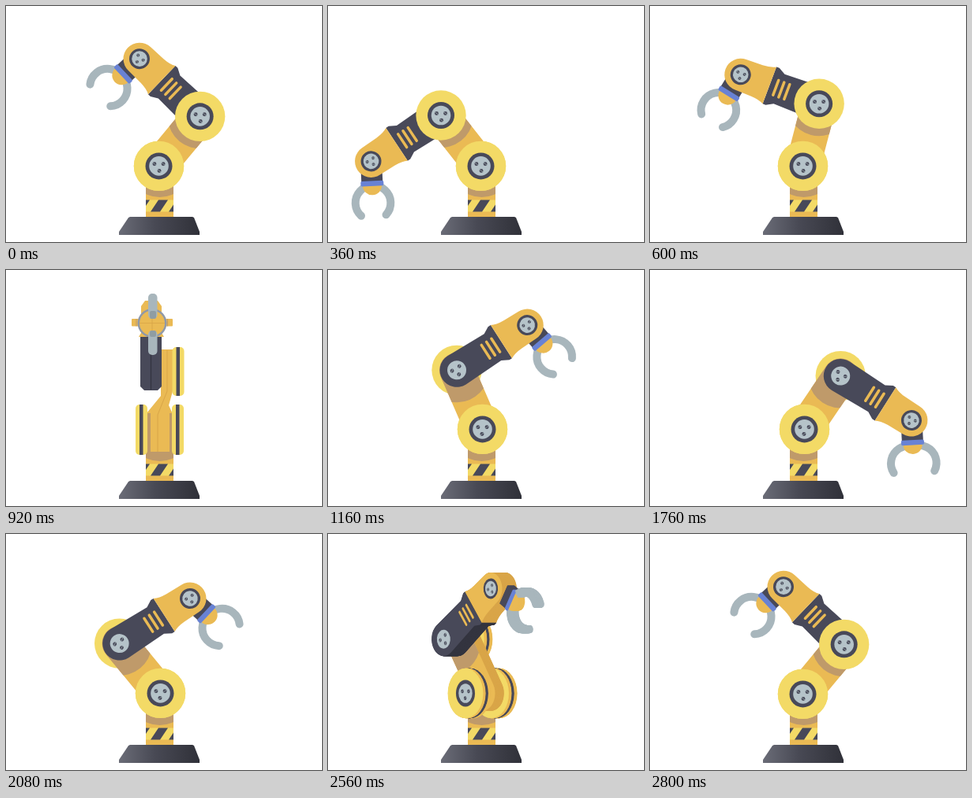
Recreate the animation shown at these times as an HTML page with a canvas. Size 400 by 300 pixels, loop 3520 ms.

```html
<!DOCTYPE html>
<html lang="en">
<head>
<meta charset="utf-8">
<title>Robot arm</title>
<style>
html, body { margin: 0; width: 100%; height: 100%; overflow: hidden; background: #fff; }
canvas { display: block; width: 400px; height: 300px; }
</style>
</head>
<body>
<canvas id="stage" width="400" height="300"></canvas>
<script>
const ctx = document.getElementById('stage').getContext('2d');
const LOOP = 3520, STEP = 40, TAU = Math.PI * 2, RAD = Math.PI / 180;
const LOWER = 81.8, UPPER = 106, CLAW_RING = 53;
const C = {
  pale: '#f3da66', gold: '#eaba54', edge: '#d9a548', shade: '#bf9a6a',
  dark: '#484959', ink: '#33343f', steel: '#a8b6bc', steelLight: '#b5c3c9',
  steelDim: '#8f9da3', blue: '#6882d4'
};

const linear = x => x, smooth = x => x * x * (3 - 2 * x), speedUp = x => x * x;

// time, yaw, lower arm, upper arm, claw direction (degrees), grip, easing into the key
const KEYS = [
  [0, 0, -39.6, -43.7, 43, .3, linear],
  [240, 0, 38, 33, 92, 1, smooth],
  [360, 0, 38.1, 33.4, 92.7, 0, smooth],
  [560, 0, -13, -3, 63, 0, speedUp],
  [640, 0, -16.2, -37.8, 53.5, 0, linear],
  [760, 0, -16.2, -37.8, 53.5, 0, linear],
  [920, 90, -26, -42, 20, 0, linear],
  [1080, 180, -30, -40, 45, 0, linear],
  [1120, 180, -30, -40, 45, 0, linear],
  [1320, 180, 33.5, 30.3, 88, 0, smooth],
  [1400, 180, 36, 33.5, 88, 0, linear],
  [1440, 180, 36, 33.5, 88, 0, linear],
  [1640, 180, 36, 33.5, 88, 1, smooth],
  [1720, 180, 35, 33, 87, 1, linear],
  [1760, 180, 34, 32.2, 87, 1, linear],
  [1880, 180, 10, 5, 65, .7, speedUp],
  [2080, 180, -39.3, -32.6, 43, .3, linear],
  [2480, 180, -39.3, -32.6, 43, .3, linear],
  [2640, 90, -26, -42, 20, .3, linear],
  [2800, 0, -39.6, -43.7, 43, .3, linear],
  [LOOP, 0, -39.6, -43.7, 43, .3, linear]
];

function poseAt(t) {
  const i = KEYS.findIndex(k => k[0] > t), p = KEYS[i - 1], q = KEYS[i];
  const x = q[6]((t - p[0]) / (q[0] - p[0]));
  const [yaw, a, b, d, grip] = [1, 2, 3, 4, 5].map(n => p[n] + (q[n] - p[n]) * x);
  return { yaw: yaw * RAD, a: a * RAD, b: b * RAD, d: d * RAD, grip };
}

function poly(points, fill) {
  ctx.beginPath();
  points.forEach(([x, y]) => ctx.lineTo(x, y));
  ctx.closePath();
  ctx.fillStyle = fill;
  ctx.fill();
}

function circle(x, y, r, fill) {
  ctx.beginPath();
  ctx.arc(x, y, r, 0, TAU);
  ctx.fillStyle = fill;
  ctx.fill();
}

function box(x, y, w, h, fill, r = 0) {
  ctx.beginPath();
  ctx.roundRect(x, y, w, h, r);
  ctx.fillStyle = fill;
  ctx.fill();
}

function line(x1, y1, x2, y2, width, color, cap = 'butt') {
  ctx.beginPath();
  ctx.moveTo(x1, y1);
  ctx.lineTo(x2, y2);
  ctx.lineWidth = width;
  ctx.strokeStyle = color;
  ctx.lineCap = cap;
  ctx.stroke();
}

function bolt(x, y, ring, r) {
  if (ring) circle(x, y, ring, C.dark);
  circle(x, y, r, C.steelLight);
  for (const k of [-155, -25, 95]) {
    const sx = x + Math.cos(k * RAD) * r * .5, sy = y + Math.sin(k * RAD) * r * .5;
    circle(sx, sy, r * .2, C.dark);
    line(sx - r * .18, sy + r * .13, sx + r * .18, sy - r * .13, .9, C.steelDim);
  }
}

function drawBase() {
  const g = ctx.createLinearGradient(143, 0, 245, 0);
  g.addColorStop(0, '#6a6c77');
  g.addColorStop(.45, '#484954');
  g.addColorStop(1, '#303139');
  poly([[155, 269], [157, 268], [236, 268], [238, 269], [245, 287], [245, 291],
    [143, 291], [143, 287]], g);
}

function drawColumn() {
  ctx.save();
  ctx.beginPath();
  ctx.rect(177, 215, 35, 53);
  ctx.clip();
  box(177, 215, 35, 53, C.gold);
  circle(194.5, 203, 40, C.shade);
  box(177, 246.5, 35, 15, C.pale);
  for (const x of [160, 183, 206]) {
    poly([[x, 261.5], [x + 10, 246.5], [x + 22, 246.5], [x + 12, 261.5]], C.dark);
  }
  ctx.restore();
}

function drawJaw(side, grip) {
  ctx.save();
  ctx.scale(1, side);
  ctx.translate(CLAW_RING + 1.5 * grip, 6.5 * grip);
  ctx.rotate(15 * RAD * grip);
  ctx.beginPath();
  ctx.arc(0, 0, 22.3, 45 * RAD, Math.PI);
  ctx.lineWidth = 10;
  ctx.lineCap = 'round';
  ctx.strokeStyle = C.steel;
  ctx.stroke();
  ctx.restore();
}

function drawClaw(grip) {
  drawJaw(1, grip);
  drawJaw(-1, grip);
  ctx.beginPath();
  ctx.arc(31, 0, 12, -Math.PI / 2, Math.PI / 2);
  ctx.fillStyle = C.gold;
  ctx.fill();
  box(14, -13.5, 12, 27, C.dark);
  box(25, -14.5, 6.5, 29, C.blue, 2);
}

function drawUpper(face, backSide) {
  ctx.beginPath();
  ctx.arc(0, 0, 21.5, Math.PI / 2, Math.PI * 1.5);
  for (const [x, y] of [[54, -20], [63, -25], [67, -25],
    [67, 25], [63, 25], [54, 20]]) ctx.lineTo(x, y);
  ctx.closePath();
  ctx.fillStyle = face ? C.dark : C.ink;
  ctx.fill();
  ctx.beginPath();
  ctx.moveTo(67, 25);
  ctx.lineTo(67, -25);
  ctx.quadraticCurveTo(73, -21.5, 84, -21);
  ctx.lineTo(UPPER, -20.5);
  ctx.arc(UPPER, 0, 20.5, -Math.PI / 2, Math.PI / 2);
  ctx.lineTo(84, 21);
  ctx.quadraticCurveTo(73, 21.5, 67, 25);
  ctx.fillStyle = face ? C.gold : C.edge;
  ctx.fill();
  if (!face) return;
  for (const x of [43.5, 51, 58.5]) line(x, -10, x, 10, 3.5, C.gold, 'round');
  bolt(UPPER, 0, 13, 9.8);
  if (backSide) bolt(0, 0, 0, 12);
}

function drawLower(face) {
  ctx.beginPath();
  ctx.roundRect(-22, -LOWER - 22, 44, LOWER + 44, 22);
  ctx.fillStyle = face ? C.gold : C.edge;
  ctx.fill();
  if (!face) return;
  ctx.save();
  ctx.clip();
  circle(0, -LOWER, 41, C.shade);
  ctx.restore();
}

function disc(face, bolted, w, from, to) {
  const mid = Math.abs(w - (from + to) / 2) < 2.5;
  circle(0, 0, 31.7, face ? C.pale : mid ? C.dark : C.gold);
  if (face && bolted) bolt(0, 0, 17, 12.3);
}

// Arm seen from the front
function drawFront() {
  const sideDisc = (x, y, h) => {
    box(x, y, 15, h, C.pale, 5);
    box(x + 5, y, 4.5, h, C.dark);
  };
  ctx.beginPath();
  ctx.ellipse(194.5, 226, 17, 16, 0, 0, TAU);
  ctx.fillStyle = C.shade;
  ctx.fill();
  poly([[196, 101], [211, 101], [211, 154], [206, 172], [211, 183], [211, 231],
    [178, 231], [178, 182], [196, 160]], C.gold);
  box(178, 182, 5, 50, C.shade);
  box(207, 182, 4, 50, C.shade);
  line(204, 102, 204, 154, 1, C.edge);
  line(204, 154, 192, 184, 1, C.edge);
  line(192, 184, 192, 231, 1, C.edge);
  sideDisc(164, 171, 64);
  sideDisc(210, 171, 64);
  sideDisc(210.5, 98, 62);
  poly([[170, 84], [197, 84], [197, 148], [192, 153], [175, 153], [170, 148]], C.dark);
  line(183.5, 86, 183.5, 152, 1.2, C.ink);
  poly([[171, 46], [176, 39], [192, 39], [197, 46], [197, 80], [200, 85], [168, 85], [171, 80]], C.gold);
  box(159, 62, 52, 9.5, C.gold, 1);
  line(165, 62, 165, 71.5, 1, C.shade);
  line(204.5, 62, 204.5, 71.5, 1, C.shade);
  circle(185, 67.5, 18.5, '#8f98a8');
  circle(185, 67.5, 16, C.gold);
  line(169, 67.5, 201, 67.5, .8, C.edge);
  line(185, 52, 185, 83, .8, C.edge);
  box(180, 30, 11.5, 32, C.steel, 5);
  box(180, 77, 11.5, 31, C.steel, 5);
  box(182, 52, 8, 10, C.steelDim, 2);
  box(182, 77, 8, 8, C.steelDim, 2);
}

function drawArm({ yaw, a, b, d, grip }) {
  const c = Math.cos(yaw), s = Math.sin(yaw);
  const flip = c < 0;
  const elbow = [LOWER * Math.sin(a), -LOWER * Math.cos(a)];
  const wrist = [elbow[0] + UPPER * Math.cos(b), elbow[1] + UPPER * Math.sin(b)];

  // Stacked slices from the far side to the near one
  function slab(from, to, [x, y], turn, draw) {
    const n = s < .02 ? 0 : Math.ceil((to - from) * 2);
    for (let i = 0; i <= n; i++) {
      const k = n ? i / n : 1;
      const w = flip ? to + (from - to) * k : from + (to - from) * k;
      ctx.setTransform(-c, 0, 0, 1, 194.5 - c + w * s, 202.9 + .5 * c);
      ctx.translate(x, y);
      ctx.rotate(turn);
      draw(i === n, w);
    }
    ctx.resetTransform();
  }

  const claw = () => slab(-14, -2, wrist, d, () => drawClaw(grip));
  const shoulder = (from, to) =>
    slab(from, to, [0, 0], 0, (face, w) => disc(face, true, w, from, to));
  const parts = [
    () => shoulder(-30, -16),
    () => slab(-25, 1, elbow, b, face => drawUpper(face, flip)),
    () => slab(1, 17, [0, 0], a, drawLower),
    () => shoulder(16, 31),
    () => slab(16, 31, elbow, 0, (face, w) => disc(face, !flip, w, 16, 31))
  ];
  if (flip) parts.reverse();
  if (s < .6) claw();
  parts.forEach(part => part());
  if (s >= .6) claw();
}

function render(time) {
  const t = Math.floor(time % LOOP / STEP) * STEP;
  const pose = poseAt(t);
  ctx.resetTransform();
  ctx.fillStyle = '#fff';
  ctx.fillRect(0, 0, 400, 300);
  drawBase();
  drawColumn();
  if (Math.abs(Math.cos(pose.yaw)) < .2) drawFront();
  else drawArm(pose);
}

const start = performance.now();
function tick() {
  render(performance.now() - start);
  requestAnimationFrame(tick);
}
tick();
</script>
</body>
</html>
```
